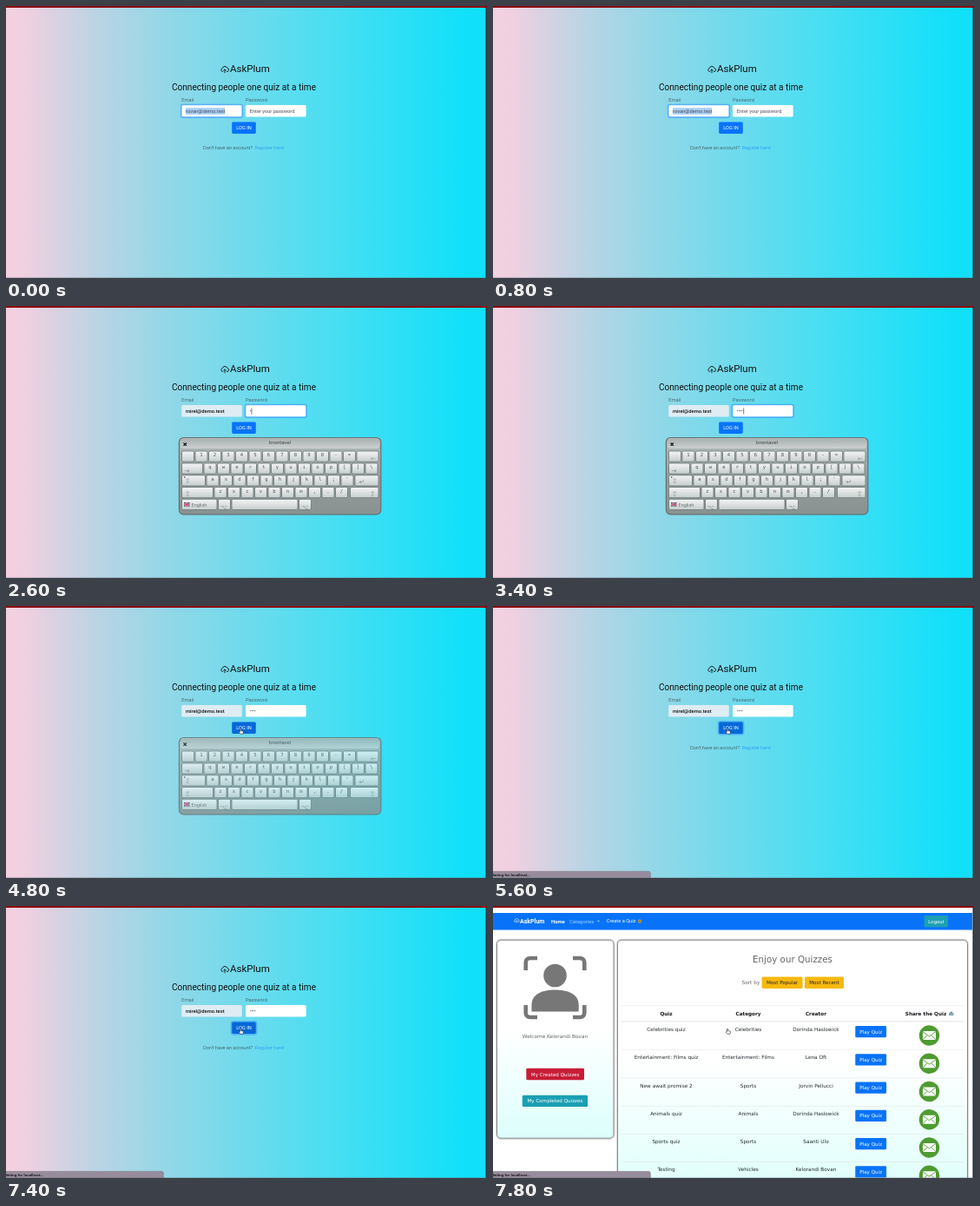
An HTML page for the animation above (8 s loop, 554 px wide and 313 px high).

```html
<!DOCTYPE html>
<html lang="en">
<head>
<meta charset="utf-8">
<title>Quiz login</title>
<style>
  html, body { margin: 0; width: 100%; height: 100%; overflow: hidden; }
  svg { display: block; width: 100%; height: 100%; }
  text { white-space: pre; }
  .roboto { font-family: Roboto, sans-serif; }
  .wide { font-family: "DejaVu Sans", sans-serif; }
  .mono { font-family: "DejaVu Sans Mono", monospace; }
  .arial { font-family: "Liberation Sans", sans-serif; }
</style>
</head>
<body>
<svg id="stage" viewBox="0 0 554 313" preserveAspectRatio="none"></svg>
<script>
const LOOP = 8000;
const APP = "AskPlum";
const OLD_MAIL = "rovan@demo.test", NEW_MAIL = "mirel@demo.test";
const BLUE = "#0873f9", TEAL = "#1b9fb4";

const attrs = o => Object.entries(o).map(([k, v]) => `${k}="${v}"`).join(" ");
const rect = (x, y, w, h, fill, more = {}) =>
  `<rect ${attrs({ x, y, width: w, height: h, fill, ...more })}/>`;
const path = (d, more) => `<path ${attrs({ d, fill: "none", ...more })}/>`;
const text = (s, x, y, size, more = {}) =>
  `<text ${attrs({ x, y, "font-size": size, class: "roboto", ...more })}>${s}</text>`;
const centred = (s, x, y, size, more = {}) =>
  text(s, x, y, size, { "text-anchor": "middle", ...more });
const group = (id, body, more = {}) => `<g ${attrs({ id, ...more })}>${body}</g>`;
const gradient = (id, direction, stops) =>
  `<linearGradient id="${id}" ${direction}>` +
  stops.map(([at, color]) => `<stop offset="${at}" stop-color="${color}"/>`).join("") +
  `</linearGradient>`;
const DOWN = 'x1="0" y1="0" x2="0" y2="1"';

const button = (label, x, y, w, fill, color = "#fff", font = "wide", size = 5.6, h = 13.4) =>
  rect(x, y, w, h, fill, { rx: 1.4 }) +
  centred(label, x + w / 2, y + h / 2 + 2, size, { fill: color, class: font });

const cloud = (x, y, color, scale = 1) =>
  path("M3 6.5H2.3A2 2 0 0 1 2.2 2.7A3 3 0 0 1 7.9 2.4A2.1 2.1 0 0 1 8 6.5H7.2M5 8.2V4M3.4 5.4L5 3.8L6.6 5.4",
    { transform: `translate(${x} ${y}) scale(${scale})`, stroke: color, "stroke-width": .9 });

function keyboard() {
  const key = (x, y, w, h = 12.2) =>
    rect(x, y, w, h, "url(#key)", { rx: 1.6, stroke: "#6d7676", "stroke-width": .8 });
  const sign = (s, x, y, size = 7) => centred(s, x, y, size, { fill: "#8b9292", class: "wide" });
  const row = (letters, x, y) => [...letters].map((c, i) =>
    key(x + 15.5 * i, y, 14) +
    centred(c, x + 15.5 * i + 7, y + 6.2, 5.6, { fill: "#505858", class: "mono" })).join("");
  return rect(199.4, 151.5, 232.4, 88.3, "url(#case)", { rx: 5, stroke: "#66706f", "stroke-width": 1.2 }) +
    rect(201, 153, 229, 11, "url(#bar)", { rx: 3 }) +
    centred("brontavel", 315.5, 159.3, 6, { fill: "#414848" }) +
    path("M204.5 157.5l3.4 3.4m0-3.4l-3.4 3.4", { stroke: "#111", "stroke-width": 1.1 }) +
    row(" 1234567890-=", 202.5, 167) + key(404, 167, 25) + sign("←", 423, 178.3) +
    key(202.5, 181, 24) + row("qwertyuiop[]\\", 228, 181) + sign("⇥", 208.5, 192) +
    key(202.5, 194.8, 27) + row("asdfghjkl;'", 231, 194.8) + key(402, 194.8, 27) +
    sign("⇧", 209, 204, 8) + sign("↵", 410, 205, 8) +
    rect(205, 196.3, 1.4, 1.4, "#555") +
    key(202.5, 208.5, 36) + row("zxcvbnm,./", 240, 208.5) + key(396.5, 208.5, 32.5) +
    sign("⇧", 209, 218.5, 8) + sign("⇧", 422, 218.5, 8) +
    key(202.5, 222.3, 40.5) + key(244.5, 222.3, 14) + key(260, 222.3, 76) + key(337.5, 222.3, 14) +
    sign("⌥", 251, 233.5) + sign("⌥", 344.5, 233.5) +
    rect(205, 226, 6.5, 4.6, "#46557f") +
    path("M205 228.3h6.5M208.2 226v4.6", { stroke: "#fff", "stroke-width": 1.8 }) +
    path("M205 228.3h6.5M208.2 226v4.6", { stroke: "#d32642", "stroke-width": 1.1 }) +
    text("English", 213.5, 230.5, 5.5, { fill: "#6c7474" });
}

function login() {
  const light = { fill: "#30383d", "font-weight": 300 };
  const field = (id, x) => rect(x, 114, 69.6, 13.6, "#fff", { id, rx: 1.5, "stroke-width": .6 });
  const ring = (id, x, y, w, h) =>
    rect(x, y, w, h, "none", { id, rx: 2, stroke: "#3d9bff", "stroke-opacity": .65, "stroke-width": 1.7 });
  return rect(0, 0, 554, 313, "url(#sky)") +
    cloud(247, 69, "#111") +
    text(APP, 258, 76.2, 11.5, { fill: "#111" }) +
    centred("Connecting people one quiz at a time", 274, 96.7, 10.1, { fill: "#111" }) +
    text("Email", 202.3, 109.5, 5.7, light) + text("Password", 276, 109.5, 5.7, light) +
    field("mailBox", 202.2) + field("passBox", 276) +
    ring("mailRing", 201.7, 113.5, 70.6, 14.6) + ring("passRing", 275.5, 113.5, 70.6, 14.6) +
    rect(207, 117.2, 45, 7.6, "#a9cdf5", { id: "selection" }) +
    text("", 207, 123.1, 5.8, { id: "mail" }) +
    text("", 280.7, 123, 5.7, { id: "pass", fill: "#495057" }) +
    rect(288.6, 117.5, .6, 7, "#222", { id: "caret" }) +
    ring("loginRing", 259.5, 133, 29, 14.6) +
    group("loginButton", button("LOG IN", 260.2, 133.6, 27.6, "inherit", "#fff", "roboto", 5.7), { fill: BLUE }) +
    group("register", text("Don't have an account?", 227, 164.6, 5.65, light) +
      text("Register here!", 286.6, 164.6, 5.65, { fill: "#2089f5", "font-weight": 300 })) +
    group("keys", keyboard());
}

const quizzes = [
  ["Celebrities quiz", "Celebrities", "Dorinda Haslowick"],
  ["Entertainment: Films quiz", "Entertainment: Films", "Lena Oft"],
  ["New await promise 2", "Sports", "Jorvin Pellucci"],
  ["Animals quiz", "Animals", "Dorinda Haslowick"],
  ["Sports quiz", "Sports", "Saanti Ulo"],
  ["Testing", "Vehicles", "Kelorandi Bovan"],
];

function dashboard() {
  const columns = [199.5, 294, 372];
  const body = { fill: "#242a2e", class: "wide" };
  const bold = { ...body, fill: "#16191c", "font-weight": 700 };
  const grey = { fill: "#666", class: "wide" };
  const card = (x, w, h, fill) =>
    rect(x - .6, 38.7, w + 1.2, h + 1.2, "none", { rx: 5, stroke: "#aaa", "stroke-opacity": .4, "stroke-width": 2 }) +
    rect(x, 39.2, w, h, fill, { rx: 4.5, stroke: "#858989", "stroke-width": 1 });
  const line = (y, w = .5) => rect(148, y, 395, w, "#dce2e4");
  const mail = y => `<circle cx="502.5" cy="${y}" r="11.7" fill="#4e9b30"/>` +
    rect(495, y - 5, 15, 10, "#fff", { rx: .8 }) +
    path(`M495 ${y - 4.5}l7.5 5.5l7.5-5.5M495 ${y + 4.8}l5-5M510 ${y + 4.8}l-5-5`,
      { stroke: "#4e9b30", "stroke-width": .9 });
  const rows = quizzes.map((quiz, i) => {
    const y = 133.2 + 32.25 * i;
    return (i ? line(y) : "") +
      quiz.map((s, c) => centred(s, columns[c], y + 11, 5.75, body)).join("") +
      button("Play Quiz", 417.3, y + 4.7, 35.8, BLUE) + mail(y + 15.8);
  }).join("");

  return rect(0, 0, 554, 313, "#fff") + rect(0, 8, 552, 19.5, BLUE) +
    cloud(24, 14.2, "#fff", .65) +
    text(APP, 31, 20, 7, { fill: "#fff", "font-weight": 700 }) +
    text("Home", 67, 19.6, 5.9, { fill: "#fff", "font-weight": 700 }) +
    text("Categories", 88, 19.6, 5.9, { fill: "#a9d1ff" }) +
    path("M119.8 16.7h3.2l-1.6 1.7z", { style: "fill:#a9d1ff" }) +
    text("Create a Quiz", 130.7, 19.4, 5.7, { fill: "#fff" }) +
    `<circle cx="169" cy="17.5" r="2.1" fill="#d9a22b"/>` + rect(167.6, 17, 2.8, .9, "#42602a") +
    button("Logout", 496.6, 10.9, 27.4, TEAL, "#fff", "roboto", 5.8) +
    card(4.5, 134.5, 228, "url(#leftCard)") +
    path("M37.7 74V65a5 5 0 0 1 5-5H51M92 60h8.300a5 5 0 0 1 5 5V74M105.300 114v9a5 5 0 0 1-5 5H92M51 128H42.700a5 5 0 0 1-5-5V114",
      { stroke: "#777", "stroke-width": 4.6 }) +
    `<circle cx="71.500" cy="80" r="13.300" fill="#777"/>` +
    path("M44.500 121.500V114C44.500 101 57 96.500 71.500 96.500S98.700 101 98.700 114V121.500Z", { style: "fill:#777" }) +
    centred("Welcome Kelorandi Bovan", 71.5, 151.6, 5.8, grey) +
    button("My Created Quizzes", 38.3, 186.8, 66.7, "#c81c37") +
    button("My Completed Quizzes", 33.8, 217.7, 75.3, TEAL) +
    card(143.5, 403, 340, "url(#rightCard)") +
    centred("Enjoy our Quizzes", 345, 64.6, 10.3, grey) +
    text("Sort by", 286.5, 90, 5.8, grey) +
    button("Most Popular", 309.6, 81.6, 47, "#f7b90f", "#252525") +
    button("Most Recent", 359, 81.6, 45, "#f7b90f", "#252525") +
    line(114) + line(132.4, .9) +
    ["Quiz", "Category", "Creator"].map((s, c) => centred(s, columns[c], 126, 5.7, bold)).join("") +
    centred("Share the Quiz", 498.5, 126, 5.7, bold) +
    rect(525, 123, 5.5, 3, "#83a6b1", { rx: .6 }) + rect(526.2, 121.7, 3, 1.2, "#698894") +
    rows;
}

const stage = document.getElementById("stage");
stage.innerHTML = `<defs>` +
  gradient("sky", "", [[0, "#f2d0e0"], [.04, "#f0d0e0"], [.19, "#bad4e4"], [.36, "#8cd8e8"], [.68, "#48def2"], [.96, "#10e0fa"]]) +
  gradient("key", DOWN, [[0, "#f3f5f4"], [1, "#c6cdcd"]]) +
  gradient("case", DOWN, [[0, "#b5bdbc"], [.5, "#969e9d"], [1, "#899291"]]) +
  gradient("bar", DOWN, [[0, "#a9b2b1"], [1, "#cbd1d0"]]) +
  gradient("leftCard", DOWN, [[0, "#fff"], [.45, "#fff"], [1, "#dcfffc"]]) +
  gradient("rightCard", DOWN, [[0, "#fff"], [.4, "#fff"], [1, "#d4fffa"]]) +
  `</defs>` +
  group("login", login()) + group("dashboard", dashboard()) +
  group("status", rect(-4, 305.4, 185.3, 10, "#978c9c", { rx: 2, stroke: "#7c7480", "stroke-width": .6 }) +
    text("Waiting for localhost...", -3, 311.2, 4.3, { class: "arial", "font-weight": 700, fill: "#171217" })) +
  group("hand", path("M1.500 3.800V.9a.65.65 0 0 1 1.300 0V2.600l2.100.5q.7.2.6 1L5 6.300H2L.2 4.200q.1-.9 1.300-.4z",
    { stroke: "#222", "stroke-width": .6, style: "fill:#fff" })) +
  rect(0, 0, 554, 2, "#8d0509") + rect(552.5, 2, 1.5, 311, "#17313c") +
  rect(0, 312.3, 554, .7, "#65717a", { "fill-opacity": .5 });

const part = Object.fromEntries([...stage.querySelectorAll("[id]")].map(e => [e.id, e]));
const show = (id, on) => part[id].setAttribute("display", on ? "inline" : "none");
const set = (id, values) => Object.entries(values).forEach(([k, v]) => part[id].setAttribute(k, v));

function draw(t) {
  const done = t >= 7600, clicked = t >= 5000;
  const preview = t >= 1200 && t < 1800, filled = t >= 1800;
  const onMail = t < 2200, onPass = t >= 2200 && !clicked;
  const typed = Math.max(0, Math.min(4, Math.floor((t - 2400) / 200)));
  const keysOpen = t >= 2400 && !clicked;
  const travel = Math.min(1, Math.max(0, (t - 3800) / 600));
  const eased = travel * travel * (3 - 2 * travel);

  show("login", !done);
  show("dashboard", done);
  show("status", clicked);
  show("mailRing", onMail);
  show("passRing", onPass && t < 4400);
  show("loginRing", clicked);
  show("selection", t < 1200);
  show("register", !keysOpen);
  show("keys", keysOpen);
  show("caret", onPass && t < 3800);
  show("hand", t >= 3800);

  set("mailBox", { fill: preview ? "#e9ebee" : filled ? "#dfecf3" : "#fff" });
  set("mail", {
    class: preview ? "arial" : "roboto",
    "font-size": preview ? 4.9 : 5.8,
    "font-weight": filled ? 500 : 400,
    fill: t < 1200 ? "#465058" : "#111",
  });
  part.mail.textContent = t < 1200 ? OLD_MAIL : NEW_MAIL;
  part.pass.textContent = typed ? "•".repeat(typed) : t < 2400 ? "Enter your password" : "";
  set("pass", { "font-size": typed ? 5.3 : 5.7 });
  set("caret", { x: 280.7 + typed * 1.95 });
  set("loginButton", { fill: t >= 4400 ? "#0668d8" : BLUE });
  set("keys", { opacity: t >= 3800 ? .8 : 1 });
  set("hand", { transform: `translate(${318 - 50 * eased} ${124 + 17 * eased})` });
}

function tick(now) {
  draw(now % LOOP);
  requestAnimationFrame(tick);
}
draw(0);
requestAnimationFrame(tick);
</script>
</body>
</html>
```
